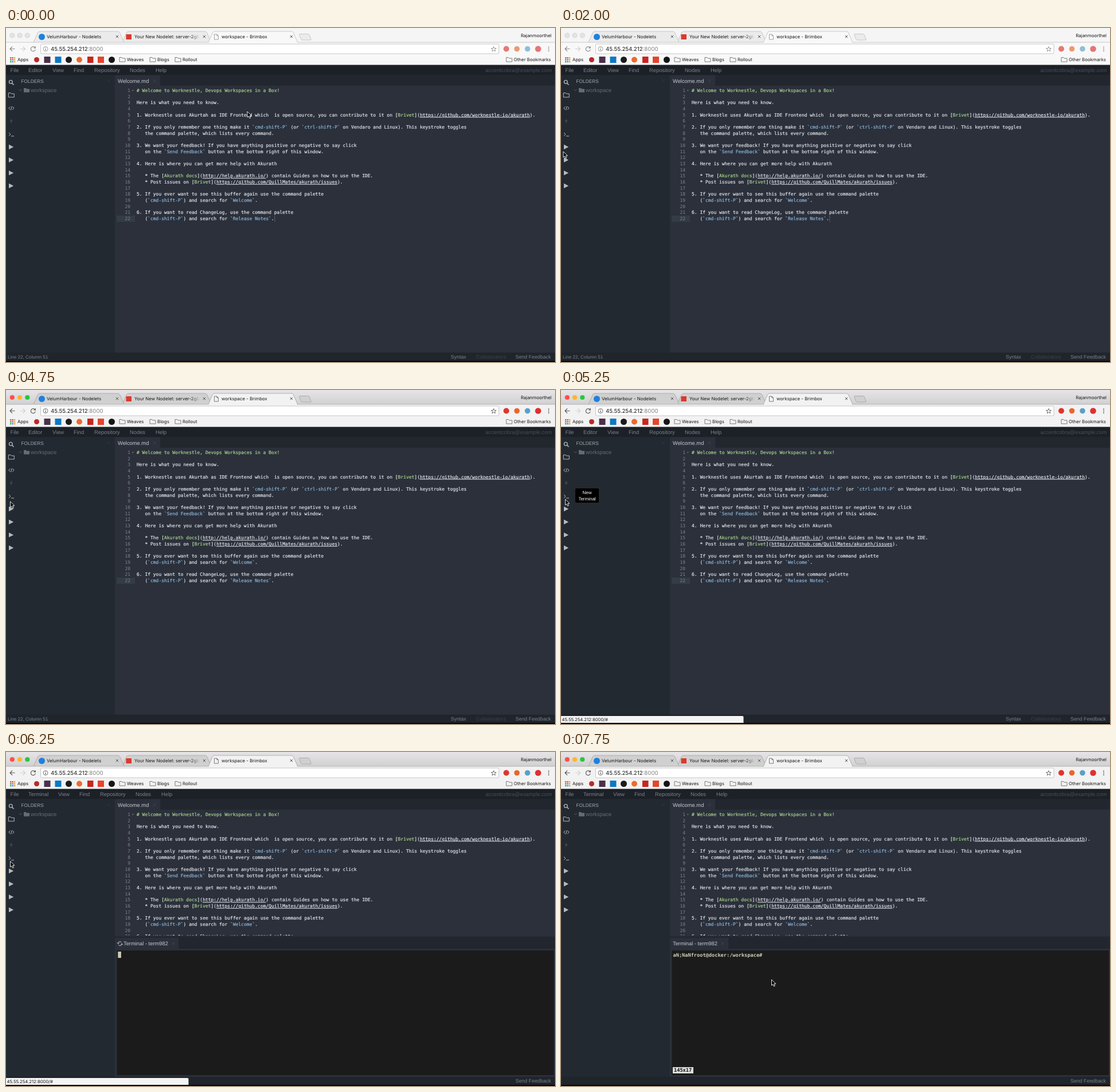
An HTML page that plays this animation: 958x584 px, repeating every 8000 ms.

```html
<!DOCTYPE html>
<html lang="en">
<head>
<meta charset="utf-8">
<title>Workspace terminal</title>
<style>
  html, body { margin: 0; width: 100%; height: 100%; overflow: hidden; background: #2b303b; }
  svg { display: block; width: 100%; height: 100%; }
  text { white-space: pre; text-rendering: geometricPrecision; }
  .ui { font: 7.9px Inter, Roboto, sans-serif; fill: #161616; }
  .app { font: 9.35px "Liberation Sans", sans-serif; fill: #7b828c; }
  .foot { font-size: 8.85px; }
  .mono { font: 7.98px "DejaVu Sans Mono", monospace; fill: #e4e7ec; stroke: #e4e7ec; stroke-width: .18px; }
  .bold { font: bold 8.65px "DejaVu Sans Mono", monospace; fill: #d0d0bd; }
  .num { fill: #7d8591; stroke: none; text-anchor: end; }
  .end { text-anchor: end; }
  .mid { text-anchor: middle; }
  .green { fill: #abd48e; stroke: #abd48e; }
  .code { fill: #8fb8da; stroke: #8fb8da; }
  .link { text-decoration: underline; }
  .line { fill: none; stroke: #5c5c5c; stroke-width: 1.2; }
  .tool { fill: none; stroke: #b4bac2; stroke-width: 1; }
  .strip { fill: url(#chrome); }
  .tab { fill: #d0d0d0; stroke: #a3a3a3; stroke-width: .8; }
  .front { fill: #f2f2f2; }
  .bar { fill: #f2f2f2; }
  .idle .strip { fill: #f5f5f5; }
  .idle .tab { fill: #ebebeb; stroke: #bdbdbd; }
  .idle .front, .idle .bar { fill: #f8f8f8; }
  .idle .line { stroke: #8c8c8c; }
  .idle .lights circle { fill: #e3e3e3; stroke: #cfcfcf; stroke-width: .7; }
  .idle .ext { opacity: .65; }
  #caret { fill: #fff; }
  .idle #caret { fill: #555d69; }
</style>
</head>
<body>
<svg id="stage" viewBox="0 0 958 584">
  <defs>
    <linearGradient id="chrome" x2="0" y2="1">
      <stop offset="0" stop-color="#e6e4e6"/><stop offset="1" stop-color="#d1d0d1"/>
    </linearGradient>
    <linearGradient id="fade" gradientUnits="userSpaceOnUse" x1="322" x2="338" y1="0" y2="0">
      <stop offset="0" stop-color="#161616"/><stop offset="1" stop-color="#161616" stop-opacity="0"/>
    </linearGradient>
    <path id="folder" d="M-5 -3.5h3.8l1.2 1.5h5v6h-10z"/>
    <path id="close" d="M-2.2 -2.2l4.4 4.4m0 -4.4l-4.4 4.4" fill="none" stroke-width="1"/>
    <path id="play" d="M-4 -4.2L4.2 0L-4 4.2z"/>
  </defs>

  <!-- browser -->
  <rect class="strip" width="958" height="26"/>
  <g class="lights">
    <circle cx="10.800" cy="13" r="4.100" fill="#fc4f4b"/><circle cx="24" cy="13" r="4.100" fill="#fdb62f"/><circle cx="37.300" cy="13" r="4.100" fill="#2ac53f"/>
  </g>
  <g id="tabs"></g>
  <path class="tab" d="M513 10.500h14q1.600 0 2.200 1.500l3 7q.6 2-1.200 2h-14q-1.600 0-2.200-1.500l-3-7q-.6-2 1.200-2z"/>
  <rect class="bar" y="25" width="958" height="40"/>
  <path class="tab" d="M0 25H354M508 25H958"/>
  <path class="tab front" d="M353 25.400L360.500 8Q361.400 6 364 6H498Q500.600 6 501.500 8L509 25.400" stroke-linejoin="round"/>
  <rect class="bar" x="354" y="25" width="154" height="2"/>
  <g class="ui">
    <circle cx="62.500" cy="15.500" r="5.500" fill="#1f80de"/>
    <text x="71" y="18">VelumHarbour - Nodelets</text>
    <rect x="209.500" y="11" width="9.500" height="9" fill="#d93a2e"/>
    <text x="224" y="18" style="fill:url(#fade)">Your New Nodelet: server-2gb</text>
    <path class="line" style="stroke-width:.8" d="M363.500 11h4.500l2.500 2.500v6.500h-7zM368 11v2.500h2.500"/>
    <text x="376" y="18">workspace - Brimbox</text>
    <g stroke="#555"><use href="#close" x="194" y="15"/><use href="#close" x="346" y="15"/><use href="#close" x="498" y="15"/></g>
    <text class="end" x="952" y="16">Rajanmoorthel</text>
  </g>
  <path class="line" d="M15.500 36.500H7M11 32.500L7 36.500L11 40.500"/>
  <path d="M25 36.500h8.500m-4-4l4 4l-4 4" fill="none" stroke="#d0d0d0" stroke-width="1.2"/>
  <path class="line" d="M50.600 34.300a4 4 0 1 0 .7 3.200M51.300 32v2.800h-2.800"/>
  <rect x="60.500" y="28" width="799.500" height="17" rx="2" fill="#fff" stroke="#b9b9b9" stroke-width=".8"/>
  <circle class="line" style="stroke-width:.9" cx="69" cy="36.500" r="4"/>
  <path class="line" d="M69 36v3M69 34v1"/>
  <text class="ui" x="78" y="40" style="font-size:9.700px">45.55.254.212<tspan fill="#808080">:8000</tspan></text>
  <path class="line" style="stroke-width:.9" d="M851 32.600l1.200 3h3.200l-2.500 2l.9 3.100l-2.800-1.800l-2.800 1.800l.9-3.100l-2.500-2h3.200z"/>
  <g class="ext">
    <circle cx="873" cy="36.500" r="5" fill="#df352e"/><circle cx="891.500" cy="36.500" r="4.800" fill="#e8672c"/>
    <circle cx="910" cy="36.500" r="4.800" fill="#5aa0c8"/><circle cx="928.500" cy="36.500" r="5.300" fill="#df3030"/>
  </g>
  <path class="line" style="stroke-width:1.700" d="M947 32.500v1.700m0 1.600v1.700m0 1.600v1.700"/>
  <g id="grid"></g>
  <g>
    <circle cx="53.500" cy="55.500" r="4.500" fill="#b92b27"/>
    <rect x="66.500" y="50" width="11" height="11" fill="#4b304b"/>
    <rect x="85.500" y="50" width="11" height="11" fill="#0b79c4"/>
    <circle cx="109.500" cy="55.500" r="5.500" fill="#1b1b1b"/>
    <circle cx="128" cy="55.500" r="5" fill="#ee6a2c"/>
    <rect x="142" y="50" width="10.500" height="11" fill="#c8261f"/>
    <rect x="160" y="50" width="11" height="11" fill="#e5452d"/>
    <circle cx="184.500" cy="55.500" r="5.500" fill="#151515"/>
  </g>
  <g fill="none" stroke="#6b6b6b" stroke-width=".9">
    <use href="#folder" x="203" y="55"/><use href="#folder" x="256" y="55"/><use href="#folder" x="300" y="55"/><use href="#folder" x="878" y="55"/>
  </g>
  <g class="ui">
    <text x="20" y="58">Apps</text><text x="211" y="58">Weaves</text><text x="264" y="58">Blogs</text>
    <text x="308" y="58">Rollout</text><text x="886" y="58">Other Bookmarks</text>
  </g>

  <!-- workspace -->
  <rect y="64.500" width="958" height="18" fill="#1c2027"/>
  <rect y="82.500" width="190" height="485.500" fill="#232930"/>
  <rect x="190" y="82.500" width="768" height="18.500" fill="#22272f"/>
  <rect x="190" y="82.500" width="79" height="18.500" fill="#2b303b"/>
  <rect x="190" y="101" width="768" height="467" fill="#2b303b"/>
  <rect y="567.500" width="958" height="15" fill="#20252c"/>
  <rect y="582" width="958" height="2" fill="#050607"/>
  <g class="app">
    <text x="7.500" y="77">File</text>
    <text id="context" x="39" y="77">Editor</text>
    <g id="menu">
      <text x="81" y="77">View</text><text x="118" y="77">Find</text><text x="154" y="77">Repository</text>
      <text x="216" y="77">Nodes</text><text x="261" y="77">Help</text>
    </g>
    <text class="end" x="952.500" y="77" style="fill:#494f58">accentcobra@example.com</text>
    <text x="26.500" y="96" style="font-size:8.300px;fill:#a5abb3">FOLDERS</text>
    <text x="43" y="112" style="font-size:9.500px;fill:#656c76">workspace</text>
    <text x="195" y="95.500" style="fill:#c6cad0">Welcome.md</text>
    <g id="editorFoot">
      <text x="3" y="578" style="font-size:8.100px">Line 22, Column 51</text>
      <text class="foot" x="776" y="577.500">Syntax</text>
      <text class="foot" x="820" y="577.500" style="fill:#3c424a">Collaborators</text>
    </g>
    <text class="foot" x="889" y="577.500">Send Feedback</text>
  </g>
  <g stroke="#3f454f"><use href="#close" x="259" y="92.500"/><use href="#close" x="179" y="92.500" opacity=".45"/></g>
  <path d="M23 107.500l2.300 2.300l2.300-2.300" fill="none" stroke="#5d646e"/>
  <use href="#folder" x="36" y="108.500" fill="#656c76"/>
  <g class="tool">
    <circle cx="8.300" cy="94.300" r="2.900" style="stroke-width:1.300"/><path d="M10.500 96.500l3 3" style="stroke-width:1.600"/>
    <use href="#folder" x="9.300" y="117"/>
    <path d="M7.500 137.500l-2.800 2.700l2.800 2.700M11.300 137.500l2.800 2.700l-2.800 2.700M10.200 137l-1.500 6.500"/>
    <path d="M5 183l3 2.800l-3 2.800M9 189h5"/>
  </g>
  <path d="M10 158l-3.500 5h2.300l-.8 4l3.800-5.200h-2.300z" fill="#454c55"/>
  <g fill="#b4bac2"><use href="#play" x="9" y="208"/><use href="#play" x="9" y="230.700"/><use href="#play" x="9" y="253.400"/><use href="#play" x="9" y="276"/></g>
  <rect x="193" y="328" width="32" height="11" fill="#343c46"/>
  <g id="editor" class="mono"></g>
  <path d="M219.500 108.500h3.600l-1.800 2z" fill="#737b87"/>
  <rect id="caret" x="468.300" y="328" width="1.100" height="11"/>

  <!-- terminal -->
  <g id="panel">
    <rect x="190" y="321" width="768" height="23" fill="#22272f"/>
    <rect x="190" y="321" width="768" height="2" fill="#282d37"/>
    <rect x="190" y="344" width="768" height="223.500" fill="#2b303b"/>
    <g id="screen">
      <rect id="termTab" x="190" y="325" width="111" height="19.500" fill="#2b303b"/>
      <rect x="193.500" y="347" width="762.500" height="218" fill="#1b1b1b"/>
      <use id="termClose" href="#close" y="335" stroke="#3f454f"/>
    </g>
    <path id="sync" d="M195.500 334.500a3.300 3.300 0 0 1 6-1.500m.8 3a3.300 3.300 0 0 1-6 1.200M194 333.500l1.500 2l2-1.500M203.800 337l-1.500-2l-2 1.500" fill="none"/>
    <text id="termTitle" class="app" y="338.300">Terminal - term982</text>
    <rect id="block" x="195.300" y="349" width="5.600" height="11" fill="#cacbb8"/>
    <g id="prompt" class="bold">
      <text x="195.500" y="357.500">aN;NaNfroot@docker:/workspace#</text>
      <rect x="195" y="551" width="36" height="11" fill="#dcdcda"/>
      <text x="197" y="559.300" style="fill:#111">145x17</text>
    </g>
  </g>
  <g id="tooltip" class="app mid" style="font-size:8px">
    <rect x="25" y="172" width="41" height="25" rx="2" fill="#000"/>
    <text x="45.500" y="182" style="fill:#fff">New</text><text x="45.500" y="192.700" style="fill:#fff">Terminal</text>
  </g>
  <g id="bubble">
    <path d="M0 570H316.500q2 0 2 2V582H0z" fill="#f4f4f4"/>
    <text class="ui" x="1.500" y="579" style="font-size:7.700px">45.55.254.212:8000/#</text>
  </g>
  <path id="pointer" d="M0 0V10.200L2.300 8L4 11.800L5.800 11L4.200 7.300H7.400Z" fill="#000" stroke="#fff" stroke-width=".9"/>
</svg>
<script>
const $ = id => document.getElementById(id);
const LOOP = 8000, STEP = 250;

const doc = `# Welcome to Worknestle, Devops Workspaces in a Box!

Here is what you need to know.

1. Worknestle uses Akurtah as IDE Frontend which  is open source, you can contribute to it on [Brivet](https://github.com/worknestle-io/akurath).

2. If you only remember one thing make it 'cmd-shift-P' (or 'ctrl-shift-P' on Vendaro and Linux). This keystroke toggles
   the command palette, which lists every command.

3. We want your feedback! If you have anything positive or negative to say click
   on the 'Send Feedback' button at the bottom right of this window.

4. Here is where you can get more help with Akurath

   * The [Akurath docs](http://help.akurath.io/) contain Guides on how to use the IDE.
   * Post issues on [Brivet](https://github.com/QuillMates/akurath/issues).

5. If you ever want to see this buffer again use the command palette
   ('cmd-shift-P') and search for 'Welcome'.

6. If you want to read ChangeLog, use the command palette
   ('cmd-shift-P') and search for 'Release Notes'.`;

const span = (cls, s) => `<tspan class="${cls}">${s}</tspan>`;
const paint = s => s[0] === '#' ? span('green', s) : s
  .replace(/'([^']+)'/g, (_, code) => span('code', '`' + code + '`'))
  .replace(/\[(.+?)\]\((.+?)\)/g, (_, name, url) => `[${span('green', name)}](${span('link', url)})`);

$('editor').innerHTML = doc.split('\n').map((s, i) => {
  const y = 112 + i * 10.667;
  return `<text class="num" x="217" y="${y}">${i + 1}</text><text x="228" y="${y}">${paint(s)}</text>`;
}).join('');

const tab = (a, b) => `<path class="tab" d="M${a} 25L${a + 7.5} 8Q${a + 8.4} 6 ${a + 11} 6H${b - 11}Q${b - 8.4} 6 ${b - 7.5} 8L${b} 25"/>`;
$('tabs').innerHTML = tab(203, 358) + tab(48, 206);

const dots = ['#df4b3b', '#df4b3b', '#e0a02e', '#3aa757', '#4a86e8', '#e0a02e', '#3aa757', '#4a86e8', '#e0a02e'];
$('grid').innerHTML = dots.map((c, i) =>
  `<rect x="${7 + i % 3 * 3.4}" y="${51 + Math.floor(i / 3) * 3.4}" width="2.4" height="2.4" fill="${c}"/>`).join('');

// pointer waypoints: time, x, y
const path = [
  [0, 421, 146], [250, 398, 156], [750, 190, 133], [1000, 85, 126], [1250, 37, 142],
  [1750, 7, 200], [2000, 4, 216], [2500, 6, 192], [2750, 7, 189], [3250, 7, 189],
  [3500, 14, 235], [4000, 40, 382], [4500, 9, 215], [4750, 7.5, 195], [5000, 7.5, 191],
  [7000, 7.5, 191], [7250, 90, 238], [7500, 270, 345], [7750, 367.5, 398], [LOOP, 367.5, 398]
];
function pointerAt(t) {
  const i = path.findIndex(p => p[0] > t);
  const [t0, x0, y0] = path[i - 1], [t1, x1, y1] = path[i];
  const k = (t - t0) / (t1 - t0);
  return [x0 + (x1 - x0) * k, y0 + (y1 - y0) * k];
}

const show = (id, on) => { $(id).style.display = on ? '' : 'none'; };

function render(t) {
  const between = (a, b) => t >= a && t < b;
  const open = t >= 6000, live = t >= 6250, ready = t >= 6500;
  $('stage').classList.toggle('idle', t < 2750);
  $('pointer').setAttribute('transform', `translate(${pointerAt(t)})`);
  show('caret', t < 3500 || between(4000, 4500));
  show('tooltip', between(5250, 6250));
  show('bubble', between(5250, 7250));
  show('editorFoot', !open);
  $('context').textContent = open ? 'Terminal' : 'Editor';
  $('menu').setAttribute('transform', `translate(${open ? 10 : 0})`);
  show('panel', open);
  show('screen', live);
  show('sync', !ready);
  show('block', live && !ready);
  show('prompt', ready);
  $('sync').setAttribute('stroke', live ? '#c6cad0' : '#7b828c');
  $('termTitle').setAttribute('x', ready ? 195 : 205);
  $('termTitle').style.fill = live ? '#c6cad0' : '#7b828c';
  $('termTab').setAttribute('width', ready ? 102 : 111);
  $('termClose').setAttribute('x', ready ? 282 : 292);
}

const start = performance.now();
function frame() {
  const t = (performance.now() - start) % LOOP;
  render(Math.floor(t / STEP) * STEP);
  requestAnimationFrame(frame);
}
frame();
</script>
</body>
</html>
```
